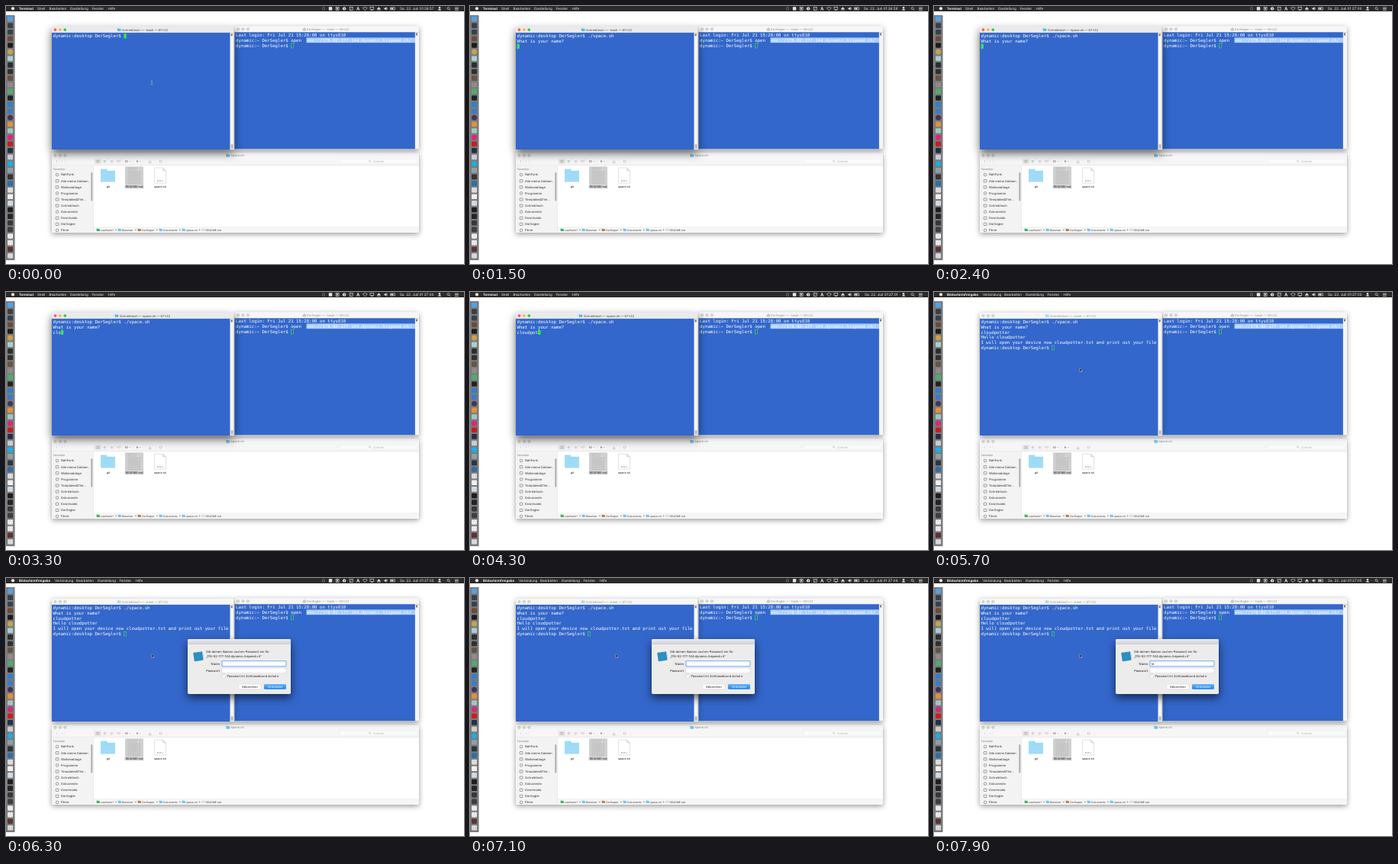
An HTML page that plays this animation: 600x338 px, repeating every 8 s.

```html
<!DOCTYPE html>
<html lang="de">
<head>
<meta charset="utf-8">
<style>
html, body { margin: 0; width: 100%; height: 100%; overflow: hidden; background: #fff; }
svg { display: block; width: 600px; height: 338px; font-family: Inter, Roboto, sans-serif; }
text { white-space: pre; text-rendering: geometricPrecision; }
.mono { font-family: "DejaVu Sans Mono", monospace; font-size: 5.715px; fill: #fff; }
.front { filter: drop-shadow(0 5px 6px rgba(0,0,0,.6)); }
.back { filter: drop-shadow(0 2px 3.5px rgba(0,0,0,.4)); }
</style>
</head>
<body>
<svg id="stage" viewBox="0 0 600 338"></svg>
<script>
const LOOP = 8000, CELL = 3.44, LINE = 6.75;
const USER = 'DerSegler', NICK = 'cloudpotter';
const HOST = '178-82-177-144.dynamic.hispeed.ch';
const RUN = 1350, SWITCH = 5350, DIALOG = 6000;
const stage = document.getElementById('stage');

const esc = s => s.replace(/&/g, '&amp;').replace(/</g, '&lt;');
const rect = (x, y, w, h, fill, more = '') =>
  `<rect x="${x}" y="${y}" width="${w}" height="${h}" fill="${fill}" ${more}/>`;
const circle = (x, y, r, fill, more = '') => `<circle cx="${x}" cy="${y}" r="${r}" fill="${fill}" ${more}/>`;
const path = (d, fill, more = '') => `<path d="${d}" fill="${fill}" ${more}/>`;
const line = (d, color, w = .5) => path(d, 'none', `stroke="${color}" stroke-width="${w}"`);
const group = (cls, ...parts) => `<g class="${cls}">${parts.join('')}</g>`;
const move = (x, y, s) => `<g transform="translate(${x} ${y})">${s}</g>`;
// y is the vertical middle of the capitals
const text = (x, y, s, size = 4.05, fill = '#222', more = '') =>
  `<text x="${x}" y="${y + size * .365}" font-size="${size}" fill="${fill}" ${more}>${esc(s)}</text>`;
const MID = 'text-anchor="middle"', END = 'text-anchor="end"';
const mono = (x, row, s) => `<text class="mono" x="${x}" y="${41 + row * LINE}">${esc(s)}</text>`;
const folder = (x, y, w, h, fill = '#74c6ee') =>
  rect(x, y, w * .45, h * .4, fill, 'rx=".4"') + rect(x, y + h * .13, w, h * .87, fill, 'rx=".5"');
const typed = (s, t, start, step) => s.slice(0, Math.max(0, Math.floor((t - start) / step) + 1));

const defs = `<defs>
  <linearGradient id="bar" x2="0" y2="1"><stop stop-color="#ebebeb"/><stop offset="1" stop-color="#d2d2d2"/></linearGradient>
  <linearGradient id="blue" x2="0" y2="1"><stop stop-color="#6cb5fa"/><stop offset="1" stop-color="#1a7ff2"/></linearGradient>
</defs>`;

function lights(x, y, active) {
  const colors = active ? ['#fc5b57', '#fdbd3e', '#34c84a'] : Array(3).fill('#d3d3d3');
  return colors.map((c, i) => circle(x + i * 6.4, y, 1.9, c, active ? '' : 'stroke="#bdbdbd" stroke-width=".3"')).join('');
}

function statusIcons() {
  const ink = '#e6e6e6', dark = '#2a2a2a', ring = `stroke="${ink}" stroke-width=".6"`;
  return [
    circle(0, 0, 1.7, 'none', 'stroke="#8a8a8a" stroke-width=".7"'),
    rect(-2.2, -2.2, 4.4, 4.4, ink),
    rect(-2, -2, 4, 4, 'none', ring) + rect(-1, -1, 2, 2, ink),
    circle(0, 0, 2.2, ink) + rect(-.3, -1.4, .7, 2.8, dark),
    rect(-2, -2, 4, 4, 'none', ring) + line('M-1.4 1.4L1.4 -1.4', ink),
    line('M-1.6 2.2L0 -2.2L1.6 2.2M-1 .6H1', ink, .9),
    path('M-3 -.9Q0 -3.2 3 -.9L0 2.4Z', 'none', ring),
    rect(-2.4, -2, 4.8, 3.2, 'none', ring) + rect(-1.2, 1.6, 2.4, .7, ink),
    path('M-2.4 .6L0 -2.1L2.4 .6Z', ink) + rect(-2.4, 1.2, 4.8, .8, ink),
    path('M-2 -.8H-.6L1 -2.3V2.3L-.6 .8H-2Z', ink) + line('M1.8 -1.3Q2.6 0 1.8 1.3', ink),
    rect(-2.8, -1.5, 5.6, 3, 'none', ring) + rect(-2.2, -.9, 3.2, 1.8, ink),
  ].map((s, i) => move(416 + i * 9.05, 3.4, s)).join('') +
    circle(568, 2.2, 1.3, ink) + path('M565.6 5.6Q568 2 570.4 5.6Z', ink) +
    circle(579.5, 3, 1.5, 'none', ring) + line('M580.6 4.1L582 5.6', ink, .7) +
    [1.7, 3.3, 4.9].map(y => rect(588, y, 4.8, .7, ink)).join('');
}

function menuBar(t) {
  const menus = t < SWITCH
    ? [[17, 'Terminal'], [41, 'Shell'], [56.5, 'Bearbeiten'], [84, 'Darstellung'], [112.5, 'Fenster'], [133.5, 'Hilfe']]
    : [[17, 'Bildschirmfreigabe'], [64, 'Verbindung'], [92, 'Bearbeiten'], [120, 'Darstellung'], [148.5, 'Fenster'], [169.5, 'Hilfe']];
  const sec = Math.floor(t / 1000 + 57.6), sep = sec % 2 ? ':' : ' ';
  const clock = ['01', sec < 60 ? '26' : '27', String(sec % 60).padStart(2, '0')].join(sep);
  return rect(0, 0, 600, 7, '#2a2a2a') + circle(9, 3.3, 2.1, '#eee') +
    menus.map(([x, s], i) => text(x, 3.4, s, 4.45, '#eee', i ? '' : 'font-weight="700"')).join('') +
    statusIcons() + text(560.5, 3.4, `Sa. 22. Juli ${clock}`, 4.7, '#eee', END);
}

function dock() {
  const colors = ('#4fa3e4 #3c4043 #34424e #6d4a3a #1c1c1c #c9a24a #a9cfd0 #2c2f31 #30302e #6b5243 #8c8c8c #4fae6a ' +
    '#1e2420 #2f7fd0 #3a7cc6 #40345e #e0913a #9fc8c4 #e0257a #c4201c #22304a #c9cdd0 #18aeee #8fa0a8 #30343c ' +
    '#2f6ea6 #dcdcdc #f0f0f0 #cfdbe4 #1e1e1e #242424 #33383a #3a3f41 #ececec #e8e8e8 #5a3434 #d6d9d9').split(' ');
  return rect(-1, 12, 12.6, 321, '#7b7b7b', 'rx=".8"') +
    colors.map((c, i) => {
      const y = 17 + i * 8.62;
      return [5, 15, 18, 22].includes(i) ? circle(5.6, y, 3.5, c) : rect(2.1, y - 3.3, 7, 6.6, c, 'rx="1"');
    }).join('');
}

function finder() {
  const soft = '#a3a3a3', edge = 'stroke="#e2e2e2" stroke-width=".4"';
  const places = ['NahFunk', 'Alle meine Dateien', 'Wolkenablage', 'Programme', 'Templates&The...', 'Schreibtisch',
    'Dokumente', 'Downloads', USER, 'Filme'];
  const crumbs = [[124, 'Laufwerk1', '#45b06c'], [152, 'Benutzer'], [178, USER, '#b98458'], [206, 'Dokumente'],
    [236, 'space.sh'], [261.5, 'README.md', '#ddd']];
  const buttons = [[63, 6.6], [70, 6.6], [116, 8.6], [125, 8.6], [134, 8.6], [143, 8.6], [153.5, 11.5], [167.5, 12], [183, 11], [197.5, 11]];
  const page = (x, y, w, h, fill) => path(`M${x} ${y}h${w - 4}l4 4v${h - 4}h${-w}Z`, fill, 'stroke="#b4b4b4" stroke-width=".4"') +
    path(`M${x + w - 4} ${y}v4h4Z`, '#e4e4e4', 'stroke="#b4b4b4" stroke-width=".3"');
  return group('back',
    rect(60, 192, 481, 105, '#f6f6f6', 'rx="1.8"'), rect(114.5, 208.5, 426.5, 81.5, '#fff'),
    rect(60, 208.2, 481, .4, '#d0d0d0'), rect(60, 208.6, 54.3, 88.2, '#f3f3f3'), rect(114.2, 208.6, .4, 88.2, '#d8d8d8'),
    rect(114.5, 289.7, 426.5, .4, '#ddd')) +
    lights(64.5, 195.8, false) + folder(288.5, 193.8, 4.6, 4) + text(294.5, 195.9, 'space.sh', 4.05, '#8a8a8a') +
    buttons.map(([x, w], i) => rect(x, 200.3, w, 6.4, i == 2 ? '#e4e4e4' : '#fafafa', `rx=".8" ${edge}`)).join('') +
    line('M67 202L65.5 203.5L67 205M72.7 202L74.2 203.5L72.7 205', soft) +
    [118.7, 120.8].map(x => rect(x, 202, 1.4, 1.2, soft) + rect(x, 204, 1.4, 1.2, soft)).join('') +
    [202, 203.4, 204.8].map(y => rect(127.5, y, 3.8, .5, soft)).join('') +
    line('M137 202V205.3M138.5 202V205.3M140 202V205.3M145.5 202.3H149.5V204.2H145.5Z', soft) +
    [156, 158].map(x => rect(x, 202, 1.3, 3, soft)).join('') + circle(172, 203.5, 1.3, soft) +
    path('M161 203L163 203L162 204.3ZM175 203L177 203L176 204.3Z', soft) +
    line('M187 203.2V205.5H190V203.2M188.5 204.3V201.5M201 202.4H204L205.2 203.5L204 204.6H201Z', soft) +
    rect(437, 200.3, 102, 6.4, '#fafafa', `rx=".8" ${edge}`) + circle(476.5, 203, 1.1, 'none', 'stroke="#aaa" stroke-width=".4"') +
    line('M477.3 203.8L478.4 205', '#aaa', .4) + text(481, 203.5, 'Suchen', 4.05, '#b4b4b4') +
    text(62, 213.8, 'Favoriten', 3.5, '#777') +
    places.map((s, i) => {
      const y = 221 + i * 8.1;
      return (i % 3 ? rect(65.2, y - 1.6, 3.8, 3.3, 'none', 'rx=".5" stroke="#777" stroke-width=".7"')
        : circle(67.1, y, 1.8, 'none', 'stroke="#777" stroke-width=".7"')) + text(72, y, s, 4.05, '#333');
    }).join('') +
    rect(111.2, 218, 2.2, 37.5, '#b2b2b2', 'rx="1.1"') +
    folder(124, 213.5, 19, 17, '#a0dbf5') + rect(124, 217, 19, .4, '#8fcfec') + text(133.5, 236.8, '.git', 3.8, '#222', MID) +
    rect(156, 210.3, 24, 24.5, '#d0d0d0', 'rx="1"') + page(160, 212, 15.5, 20.5, '#c9c9c9') +
    [217, 219, 221, 223, 225, 227].map((y, i) => rect(162.5, y, i % 2 ? 8 : 10, .4, '#b6b6b6')).join('') +
    rect(155.5, 234.5, 25, 4.8, '#d0d0d0', 'rx=".8"') + text(168, 236.8, 'README.md', 3.8, '#222', MID) +
    page(194.5, 212, 15, 20, '#fff') + text(202, 229.5, 'SHELL', 2.7, '#777', MID) + text(202, 236.8, 'space.sh', 3.8, '#222', MID) +
    crumbs.map(([x, s, c], i) => folder(x - 5.3, 291.5, 4.2, 3.4, c) + text(x, 293.4, s, 3.45, '#444') +
      (i ? path(`M${x - 8.6} 292.2l1.8 1.1l-1.8 1.1Z`, '#888') : '')).join('');
}

function terminal(x, width, active, title, rows, cursor) {
  const mid = x + 121, ink = active ? '#444' : '#969696', home = x > 200;
  const iconX = mid - title.length * 1.08 - 4.8, strip = x + width - 5.1;
  const [col, row] = cursor, cx = x + 1.5 + col * CELL, cy = 36.1 + row * LINE;
  return group(active ? 'front' : 'back',
    rect(x, 27, width, 161, active ? 'url(#bar)' : '#f6f6f6', 'rx="1.8"'),
    rect(x, 35, width, 153, '#3367cb'), rect(x, 34.8, width, .3, '#aaa')) +
    lights(x + 4.5, 31.1, active) +
    (home ? path(`M${iconX} 31L${iconX + 2.1} 28.8L${iconX + 4.2} 31V33.2H${iconX}Z`, '#c4c4c4')
      : folder(iconX, 29.2, 4.6, 3.8, active ? '#62b9e8' : '#a9daf1')) +
    text(mid + 1, 31.2, title, 4.05, ink, MID) +
    rect(strip, 35.1, 5.1, 152.9, '#f5f5f5') + rect(strip + 1.2, 36.3, 2, 3, '#777') +
    (home ? rect(393.6, 42.2, 142.4, 6.8, '#a9cdfb') : rect(strip + 1.3, 181, 2.6, 6, '#b5b5b5', 'rx="1.3"')) +
    rows.map((s, i) => mono(x + 1.5, i, s)).join('') +
    (active ? rect(cx, cy, CELL, 6.4, '#2bea54')
      : rect(cx + .3, cy + .3, CELL - .6, 5.8, 'none', 'stroke="#2bea54" stroke-width=".6"'));
}

function shell(t) {
  const prompt = `dynamic:desktop ${USER}$ `;
  const rows = [prompt + typed('./space.sh', t, 200, 110)];
  if (t >= RUN) rows.push('What is your name?', typed(NICK, t, 2850, 200));
  if (t >= 5150) rows.push(`Hello ${NICK}`, `I will open your device now ${NICK}.txt and print out your file`, prompt);
  const job = t >= 1800 && t < 5150 ? 'space.sh' : '-bash';
  return terminal(60, 238.6, t < SWITCH, `Schreibtisch — ${job} — 67×22`, rows, [rows.at(-1).length, rows.length - 1]);
}

function dialog(t) {
  return group('front', rect(238, 80, 135, 72, '#ececec', 'rx="1.8"')) +
    rect(238, 80, 135, 6.6, 'url(#bar)', 'rx="1.8"') + rect(238, 86.4, 135, .4, '#bbb') +
    rect(246, 97, 12, 11.5, '#2b8fc0', 'rx="1" transform="rotate(-8 252 103)"') +
    text(262, 96.6, 'Gib deinen Namen und ein Passwort ein für') + text(262, 102.6, `„${HOST}“`) +
    text(281, 112.4, 'Name:', 4.05, '#222', END) + text(281, 121.5, 'Passwort:', 4.05, '#222', END) +
    rect(283, 108.8, 84, 7, '#fff', 'rx=".5" stroke="#76aeea" stroke-width="1.1"') +
    rect(283, 118, 84, 6.8, '#fff', 'stroke="#c2c2c2" stroke-width=".4"') +
    text(284.8, 112.5, typed('te', t, 7350, 250)) +
    rect(283.2, 126.7, 4.3, 4.3, '#fff', 'rx=".7" stroke="#b5b5b5" stroke-width=".4"') +
    text(289.5, 129, 'Passwort im Schlüsselbund sichern') +
    rect(305, 139, 29, 6.8, '#fff', 'rx="1.2" stroke="#c4c4c4" stroke-width=".4"') + text(319.5, 142.4, 'Abbrechen', 4.05, '#222', MID) +
    rect(338, 139, 29, 6.8, 'url(#blue)', 'rx="1.2"') + text(352.5, 142.4, 'Verbinden', 4.05, '#fff', MID);
}

function pointer(t) {
  if (t < 200) return line('M189.8 97.8Q191 97.8 191 99V102Q191 103.2 189.8 103.2M192.2 97.8Q191 97.8 191 99M191 102Q191 103.2 192.2 103.2', '#aab4cc', .6);
  if (t < SWITCH) return '';
  return path('M190.8 99.6V104.4L192 103.3L192.8 105L193.6 104.6L192.8 103H194.3Z', '#111', 'stroke="#fff" stroke-width=".4"');
}

const login = ['Last login: Fri Jul 21 15:28:00 on ttys010',
  `dynamic:~ ${USER}$ open  vnc://${HOST}/`, `dynamic:~ ${USER}$ `];
const fixed = defs + dock() + finder() +
  move(0, -.8, terminal(299.6, 241.4, false, `${USER} — -bash — 58×22`, login, [21, 2]));

let shown = '';
function frame(now) {
  const t = now % LOOP;
  const scene = fixed + menuBar(t) + shell(t) + (t >= DIALOG ? dialog(t) : '') + pointer(t);
  if (scene !== shown) stage.innerHTML = shown = scene;
  requestAnimationFrame(frame);
}
frame(0);
</script>
</body>
</html>
```
